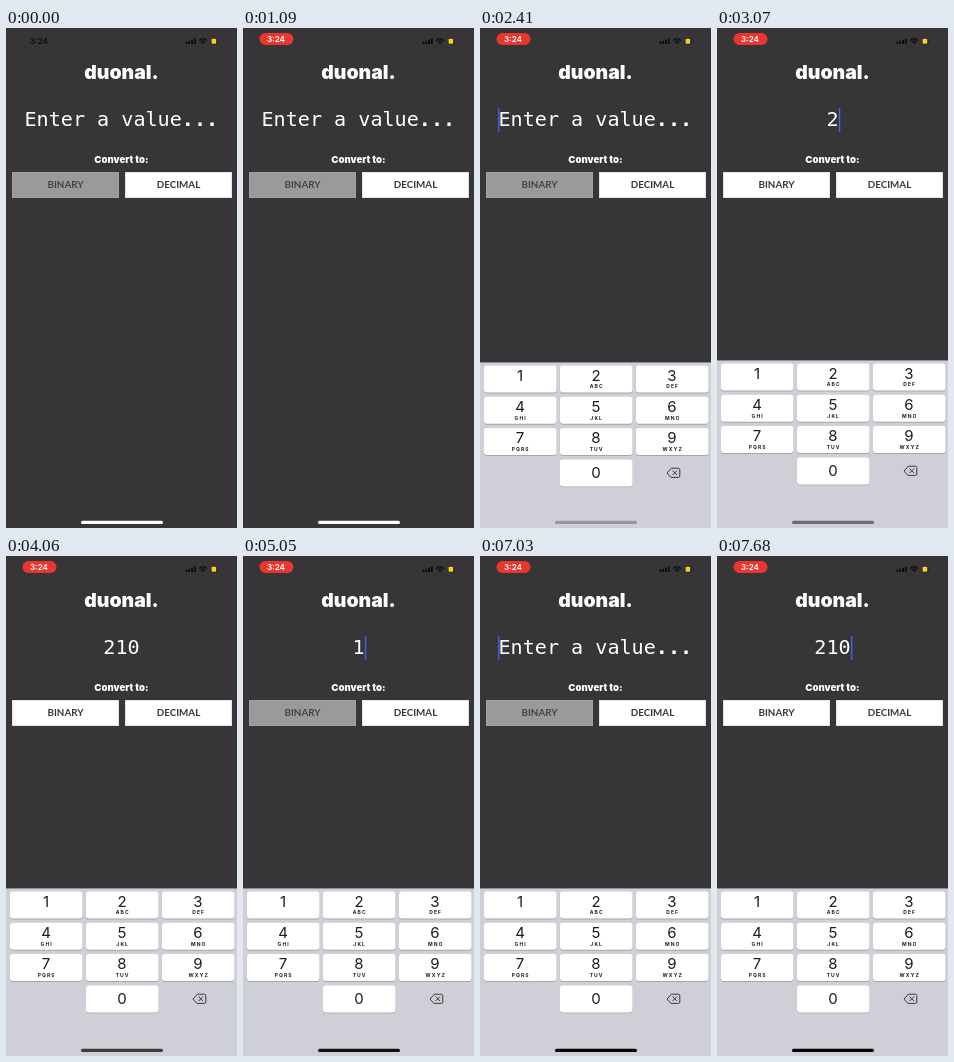
Animation, 231 px wide and 500 px high, one loop 8000 ms. Source, as an HTML page:

```html
<!DOCTYPE html>
<html lang="en">
<head>
<meta charset="utf-8">
<title>Number converter</title>
<style>
  html, body { margin: 0; width: 100%; height: 100%; overflow: hidden; background: #373538; }
  svg { display: block; width: 100%; height: 100%; }
  text { text-anchor: middle; fill: #fff; }
  .brand { font: 900 19.4px Inter, sans-serif; }
  .label { font: 900 9.6px Inter, sans-serif; }
  .value { font: 20.1px "DejaVu Sans Mono", monospace; white-space: pre; }
  .dots { font-weight: 700; }
  .clock { font: 600 8.1px Inter, sans-serif; }
  .button rect { fill: #fff; stroke: #e4e3e5; }
  .button text { font: 700 9.8px Lato, sans-serif; fill: #38363a; }
  .button.off rect { fill: #9b999c; stroke: #a3a1a4; }
  .button.off text { fill: #454347; }
  .key rect { fill: #fff; }
  .key .edge { fill: #a5a6ab; }
  .key.down .face { fill: #b6b9c2; }
  .key text { fill: #1c1c1e; }
  .digit { font: 15px Inter, sans-serif; }
  .letters { font: 700 5px Inter, sans-serif; letter-spacing: 1.1px; }
</style>
</head>
<body>
<svg viewBox="0 0 231 500" preserveAspectRatio="none">
  <rect width="231" height="500" fill="#373538"/>

  <rect id="pill" x="16.5" y="5" width="34" height="12" rx="6" fill="#e8372f"/>
  <text id="clock" class="clock" x="33">3:24</text>
  <g fill="#0b0b0c">
    <path d="M179.5 13.5h1.8v2.5h-1.8zM182.3 12.7h1.8v3.3h-1.8zM185.1 11.7h1.8v4.3h-1.8zM187.9 10.5h1.8v5.5h-1.8z"/>
    <path d="M193 12.6q4-3.8 8 0M194.7 14.2q2.3-2 4.6 0" fill="none" stroke="#0b0b0c" stroke-width="1.2"/>
    <circle cx="197" cy="15.4" r=".9"/>
    <rect x="205" y="10" width="7" height="6.6" rx="1.5" opacity=".3"/>
    <rect x="205.6" y="10.8" width="4.6" height="5" rx=".8" fill="#f5cf2e"/>
  </g>

  <text class="brand" x="115.5" y="51">duonal.</text>
  <text id="value" class="value" x="115.5" y="98.3"></text>
  <text id="prompt" class="value" x="115.3" y="98.3">Enter a value<tspan class="dots">...</tspan></text>
  <rect id="caret" y="80" width="1.4" height="24" fill="#4166e0"/>
  <text class="label" x="115.5" y="135">Convert to:</text>

  <g id="toBase2" class="button">
    <rect x="6.5" y="144.5" width="106" height="25"/><text x="59.5" y="160.2">BINARY</text>
  </g>
  <g class="button">
    <rect x="119.5" y="144.5" width="106" height="25"/><text x="172.5" y="160.2">DECIMAL</text>
  </g>

  <g id="keyboard">
    <rect width="231" height="170" fill="#cfd0d7"/>
    <rect width="231" height="1" fill="#8d8c91"/>
    <g id="keys"></g>
    <g fill="none" stroke="#3a3a3d" stroke-linejoin="round" stroke-linecap="round">
      <path d="M187.3 110.8l4-4.6h7.2q1.3 0 1.3 1.3v6.6q0 1.3-1.3 1.3h-7.2z"/>
      <path d="M192.8 108.8l4 4m0-4l-4 4"/>
    </g>
  </g>
  <rect id="home" x="75" y="492.8" width="82" height="3.2" rx="1.6"/>
</svg>
<script>
const LOOP = 8000;
const $ = id => document.getElementById(id);

// Each step changes some properties and keeps the rest.
const steps = [
  [0,    { pill: false, value: "", caret: 0, board: 500, home: "#fff", pressed: false }],
  [100,  { pill: true }],
  [2080, { board: 474, home: "#a6a6aa" }],
  [2410, { board: 334, home: "#98989c", caret: 1 }],
  [2740, { board: 332, home: "#828286" }],
  [3070, { value: "2", home: "#6c6c70" }],
  [3400, { value: "21", home: "#5a5a5d" }],
  [3730, { value: "210", home: "#4a4a4c" }],
  [4060, { caret: 0, home: "#3c3c3e" }],
  [4390, { caret: 1, home: "#2c2c2d" }],
  [4720, { value: "11010010", caret: 0, home: "#202021" }],
  [5050, { value: "1", caret: 1, home: "#101011" }],
  [5380, { value: "10" }],
  [5680, { caret: 0 }],
  [6050, { caret: 0.55, home: "#050505" }],
  [6370, { value: "2", caret: 0 }],
  [7030, { value: "", caret: 1 }],
  [7360, { value: "21", pressed: true }],
  [7680, { value: "210", pressed: false }]
];

const letters = ["", "ABC", "DEF", "GHI", "JKL", "MNO", "PQRS", "TUV", "WXYZ"];

function keyMarkup(digit, column, row, caption = "") {
  const x = 4 + column * 76, y = 3.5 + row * 31.3;
  return `<g class="key" id="key${digit}">
    <rect class="edge" x="${x}" y="${y + 0.9}" width="72.5" height="27" rx="3"/>
    <rect class="face" x="${x}" y="${y}" width="72.5" height="27" rx="3"/>
    <text class="digit" x="${x + 36}" y="${y + (digit ? 15.3 : 18.7)}">${digit}</text>
    <text class="letters" x="${x + 36.7}" y="${y + 22.9}">${caption}</text></g>`;
}

$("keys").innerHTML = letters
  .map((caption, i) => keyMarkup(i + 1, i % 3, Math.floor(i / 3), caption))
  .join("") + keyMarkup(0, 1, 3);

const show = (id, visible) => $(id).setAttribute("visibility", visible ? "visible" : "hidden");

function draw(time) {
  const state = {};
  for (const [start, change] of steps) if (start <= time) Object.assign(state, change);
  const { pill, value, caret, board, home, pressed } = state;

  show("pill", pill);
  $("clock").setAttribute("y", pill ? 14 : 16);
  $("clock").style.fill = pill ? "#fff" : "#0b0b0c";

  show("prompt", !value);
  $("value").textContent = value;
  $("caret").setAttribute("x", value ? 115.8 + value.length * 6.05 : 18);
  $("caret").setAttribute("opacity", caret);
  $("toBase2").classList.toggle("off", /^[01]*$/.test(value));

  $("keyboard").setAttribute("transform", `translate(0 ${board})`);
  $("key1").classList.toggle("down", pressed);
  $("home").setAttribute("fill", home);
}

function tick() {
  draw(performance.now() % LOOP);
  requestAnimationFrame(tick);
}
tick();
</script>
</body>
</html>
```
